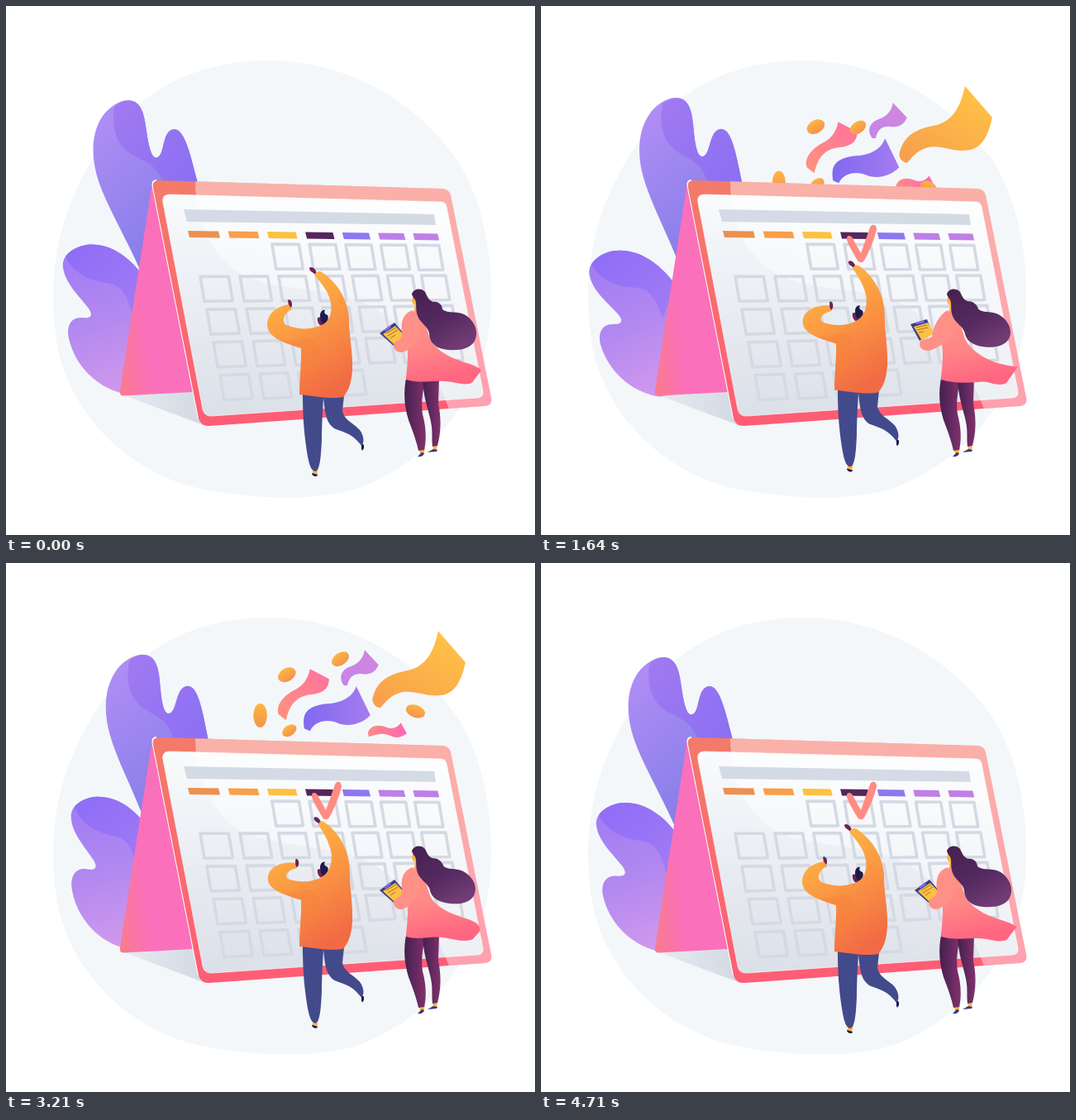
These frames come from a looping animation (640 by 640 pixels, 4.78 s). An HTML page:

```html
<!DOCTYPE html>
<html lang="en">
<head>
<meta charset="utf-8">
<title>Calendar celebration</title>
<style>
html, body { margin: 0; width: 100%; height: 100%; overflow: hidden; background: #fff; }
svg { display: block; width: 100vw; height: 100vh; }
</style>
</head>
<body>
<svg viewBox="0 0 640 640" xmlns="http://www.w3.org/2000/svg">
<defs>
  <linearGradient id="leafA" x1="0" y1="0" x2=".5" y2="1"><stop stop-color="#b48ff7"/><stop offset=".75" stop-color="#8c80ea"/><stop offset="1" stop-color="#837ce8"/></linearGradient>
  <linearGradient id="leafB" x1="0" y1="0" x2="1" y2=".8"><stop stop-color="#a17af1"/><stop offset="1" stop-color="#8b6ff3"/></linearGradient>
  <linearGradient id="leafC" x1=".3" y1="0" x2=".5" y2="1"><stop stop-color="#a07cf5"/><stop offset=".5" stop-color="#b188f0"/><stop offset="1" stop-color="#cf98ed"/></linearGradient>
  <linearGradient id="leafD" x1="0" y1="0" x2="1" y2="1"><stop stop-color="#8e6cf8"/><stop offset="1" stop-color="#a27df3"/></linearGradient>
  <linearGradient id="side" x1="0" y1="1" x2=".4" y2=".86"><stop stop-color="#f97c8c"/><stop offset="1" stop-color="#fb70ba"/></linearGradient>
  <linearGradient id="shade"><stop stop-color="#e6ebf1"/><stop offset="1" stop-color="#d3dae3"/></linearGradient>
  <linearGradient id="frame" x1="0" y1="0" x2=".15" y2="1"><stop stop-color="#f37b69"/><stop offset="1" stop-color="#fe5d75"/></linearGradient>
  <linearGradient id="panel" x1=".5" y1="0" x2=".4" y2="1"><stop stop-color="#fbfcfd"/><stop offset=".35" stop-color="#eff2f6"/><stop offset="1" stop-color="#dce0e8"/></linearGradient>
  <linearGradient id="shirt" x1=".2" y1="0" x2=".6" y2="1"><stop stop-color="#ffbc42"/><stop offset=".45" stop-color="#fb9a42"/><stop offset="1" stop-color="#f26a44"/></linearGradient>
  <linearGradient id="coat" x1="0" y1="0" x2=".2" y2="1"><stop stop-color="#ff9585"/><stop offset=".55" stop-color="#ff8686"/><stop offset="1" stop-color="#ff6681"/></linearGradient>
  <linearGradient id="hair" x1="0" y1="0" x2=".6" y2="1"><stop stop-color="#46204f"/><stop offset=".6" stop-color="#542a60"/><stop offset="1" stop-color="#713b73"/></linearGradient>
  <linearGradient id="tights"><stop stop-color="#43204f"/><stop offset="1" stop-color="#81316c"/></linearGradient>
  <linearGradient id="gold" x1=".8" y1="0" x2=".2" y2="1"><stop stop-color="#ffc445"/><stop offset="1" stop-color="#f8a04c"/></linearGradient>
  <linearGradient id="amber" x1="0" y1="0" x2="0" y2="1"><stop stop-color="#ffb440"/><stop offset="1" stop-color="#f2954f"/></linearGradient>
  <linearGradient id="rose" x1="1" y1="0" x2="0" y2="1"><stop stop-color="#ff71a0"/><stop offset="1" stop-color="#ff937c"/></linearGradient>
  <linearGradient id="pink"><stop stop-color="#ff8a83"/><stop offset="1" stop-color="#fd68b5"/></linearGradient>
  <linearGradient id="lilac" x1="0" y1="1" x2="1" y2="0"><stop stop-color="#c484e9"/><stop offset="1" stop-color="#d287dc"/></linearGradient>
  <linearGradient id="iris"><stop stop-color="#8069f0"/><stop offset="1" stop-color="#a57cf0"/></linearGradient>
  <clipPath id="board"><path id="boardShape" d="M186 211L529 221Q536 222 538 229L587 474Q589 483 579 484L246 508Q236 509 233 499L178 220Q176 211 186 211Z"/></clipPath>
  <mask id="drawn" maskUnits="userSpaceOnUse" x="350" y="250" width="70" height="70">
    <path id="stroke" d="M370 275L387 306L404 262" pathLength="1" fill="none" stroke="#fff" stroke-width="16" stroke-dasharray="1 2"/>
  </mask>
</defs>

<path fill="#f3f7fa" d="M318 66C415 66 497 117 545 185C573 226 588 290 587 355C587 465 520 542 440 578C390 600 310 598 240 585C140 565 75 485 62 410C50 340 60 270 90 212C140 110 220 66 318 66Z"/>
<path fill="url(#shade)" d="M140 470L226 464L236 506Z"/>

<g id="tall">
  <path fill="url(#leafA)" d="M175 350C152 290 125 250 112 212C103 185 102 155 117 133C128 118 145 110 156 116C170 124 168 150 174 172C177 184 183 188 188 177C192 165 192 151 203 149C217 148 224 185 232 214L240 340Z"/>
  <path fill="url(#leafB)" d="M131 122C127 150 135 172 157 182C173 190 184 196 190 214L195 228L235 228L232 214C224 185 217 148 203 149C192 151 192 165 188 177C183 188 177 184 174 172C168 150 170 124 156 116C147 112 138 116 131 122Z"/>
</g>
<g id="low">
  <path fill="url(#leafC)" d="M172 336C150 300 122 286 97 289C80 292 67 303 69 316C71 335 88 350 100 366C107 377 100 378 92 377C78 376 73 388 76 402C82 430 105 460 142 469L170 466Z"/>
  <path fill="url(#leafD)" d="M72 303C85 330 110 333 128 336C142 340 148 355 153 375L172 336C150 300 122 286 97 289C86 291 77 296 72 303Z"/>
</g>
<g id="confetti"></g>

<path fill="url(#side)" d="M177 213L226 467L142 471.5Q137 471.5 138 465Z"/>
<path fill="none" stroke="#fff" stroke-width="2" d="M182 211Q176 211 178 220L233 499"/>
<use href="#boardShape" fill="url(#frame)"/>
<path fill="url(#panel)" stroke="#fff" stroke-opacity=".6" d="M198 228L526 237Q532 237 533 243L577 466Q578 473 571 474L250 496Q240 497 238 488L190 238Q188 228 198 228Z"/>
<path clip-path="url(#board)" fill="#fff" fill-opacity=".42" d="M229 205C228 250 240 290 275 318C320 350 400 335 450 368C495 398 518 440 537 490L600 490L560 205Z"/>
<path fill="#d5dbe5" d="M215 246L518 252L520 265L219 261Z"/>
<g id="days"></g>
<path id="cells" fill="none" stroke="#d4d9e3" stroke-width="3.6" stroke-linejoin="round"/>
<path mask="url(#drawn)" fill="#ff8b84" d="M370 283C369 278 374 276 377 281L387 299L398 268C400 263 406 264 406 270C405 278 397 298 391 308C389 311 385 311 383 308C379 301 372 290 370 283Z"/>

<g id="man">
  <path fill="#fdb43f" d="M371 559L378 559L376 567L371 567Z"/>
  <path fill="#1f1a4b" d="M370 565L377 567Q377 569 374 569Q370 568 370 565ZM430 529L433 531L433 535L431 538L430 536Z"/>
  <path fill="#434a8b" d="M359 470C359 500 361 522 365 545C367 555 369 562 374 563C380 562 381 545 382 525C382 508 383 490 384 474C386 490 386 503 397 511C409 516 419 517 430 532C434 528 433 520 428 513C421 505 409 501 407 490L409 471Z"/>
  <path fill="#6b2358" d="M377 377C376 382 379 388 384 387L387 375Z"/>
  <path fill="#1f1a4b" d="M380 375C380 370 383 367 386 368C384 371 386 373 389 374C391 378 389 383 384 385L381 381Z"/>
  <path id="handUp" fill="#6b2358" d="M367 317C368 315 372 316 374 319C377 323 375 327 372 323C369 321 367 320 367 317Z"/>
  <path id="handLow" fill="#6b2358" d="M341 356C342 354 346 356 346 361C346 367 342 366 342 362Z"/>
  <path fill="url(#shirt)" data-by="lift" d="M373 325C376 321 379 320 382 322C399 333 414 354 415 378C415 400 420 420 419 440C418 455 415 465 408 473C395 476 372 472 355 470C355 450 358 430 357 414C335 407 316 401 316 385C317 370 330 363 342 361L346 367C336 371 333 381 339 386C352 391 366 392 376 388C388 386 395 376 393 360C391 346 383 338 373 325Z"
    data-to="M379 322C380 318 383 317 386 319C402 330 416 352 416 378C416 400 420 420 419 440C418 455 415 465 408 473C395 476 372 472 355 470C355 450 358 430 357 414C337 408 317 402 317 389C317 374 335 369 351 371L354 378C343 379 337 385 341 389C352 393 366 393 376 389C388 385 395 374 394 358C392 346 387 334 379 322Z"/>
  <path fill="#f5813c" fill-opacity=".4" d="M330 404C345 408 358 402 368 401C380 405 382 422 377 434C371 446 360 447 356 451C357 434 357 424 357 414Q343 410 330 404Z"/>
</g>

<g id="woman">
  <path fill="#fdb43f" d="M500 536L507 535L505 543L501 543ZM516 530L522 530L521 538L517 538Z"/>
  <path fill="#343a80" d="M498 545L503 540L506 541C505 545 501 546 498 545ZM510 540L517 536L522 537L521 539Z"/>
  <path fill="url(#tights)" d="M487 438C480 462 481 481 487 501C492 514 497 528 499 538L506 537C509 524 508 508 504 494C502 480 504 468 507 453Z"/>
  <path fill="url(#tights)" d="M504 450C505 478 513 492 515 509C516 518 515 526 516 533L522 532C526 517 527 500 523 481L524 450Z"/>
  <path fill="#3a3f86" data-by="raise" d="M452 396L470 383L486 402L469 411Z" data-to="M447 385L467 379L473 394L458 405Z"/>
  <path fill="#fdc041" data-by="raise" d="M456 397L471 387L486 403L470 410Z" data-to="M451 388L468 383L475 396L461 405Z"/>
  <path fill="#7a6cec" data-by="raise" d="M457 392L465 386L466 389L459 394Z" data-to="M453 383L463 380L464 383L454 385Z"/>
  <path fill="none" stroke="#9a6a3c" stroke-width=".9" data-by="raise" d="M460 396L472 389M462 399L474 392M465 402L471 398" data-to="M454 389L467 386M455 392L468 389M457 395L463 394"/>
  <path fill="#fdb43f" d="M493 351C490 356 491 360 495 362L493 372L500 374L500 354Z"/>
  <path fill="url(#coat)" data-by="sway" d="M497 367C488 371 480 385 484 405C488 420 485 435 484 452C500 457 515 456 530 455C540 452 552 462 563 456L577 436C565 435 555 434 540 427C526 420 515 410 512 400C508 385 503 375 497 367Z"
    data-to="M497 367C488 371 480 385 484 405C488 420 485 435 484 452C500 457 515 450 530 453C545 456 556 459 565 455L573 446C575 434 564 433 540 424C526 418 515 410 512 400C508 385 503 375 497 367Z"/>
  <path fill="#ff9087" data-by="raise" d="M492 368C482 371 477 380 479 395C480 402 475 405 470 407C467 412 471 420 479 419C488 416 497 410 502 393Z"
    data-to="M492 368C482 373 474 388 473 400C468 403 462 404 459 405C456 411 460 418 470 417C482 413 492 406 502 393Z"/>
  <path fill="url(#hair)" data-by="lift" d="M491 349C492 342 502 340 507 346C510 352 511 356 517 358C523 357 528 362 528 367C535 373 546 368 556 374C568 382 572 395 567 405C562 415 548 417 535 416C520 415 512 407 512 396C510 386 500 384 497 372C495 362 498 358 493 353Z"
    data-to="M491 349C492 342 502 340 507 346C510 352 511 356 517 357C523 357 528 362 530 367C536 372 548 368 556 375C566 382 570 392 566 401C561 410 549 412 538 411C523 409 515 404 513 395C510 386 500 384 497 372C495 362 498 358 493 353Z"/>
</g>
</svg>

<script>
const LOOP = 4780, STEP = 1000 / 14;
const $ = id => document.getElementById(id);
const clamp = v => Math.min(1, Math.max(0, v));
const ease = v => (1 - Math.cos(Math.PI * clamp(v))) / 2;

function add(parent, name, attrs) {
  const el = document.createElementNS('http://www.w3.org/2000/svg', name);
  for (const k in attrs) el.setAttribute(k, attrs[k]);
  return parent.appendChild(el);
}

// Calendar sheet: weekday bars and slanted cells
['#ec914f', '#f99f4a', '#fdc141', '#54265c', '#8d78f0', '#be80e6', '#be80e6'].forEach((fill, c) => {
  const x = 220 + 49.3 * c - .65 * c * c, y = 272 + .5 * c, w = 37 - 1.2 * c;
  add($('days'), 'path', { fill, d: `M${x} ${y}l${w} .4l2 8.1l${-w} -.4Z` });
});
let grid = '';
for (let r = 0; r < 5; r++) {
  for (let c = r ? 0 : 2; c < (r < 4 ? 7 : 4); c++) {
    const x = 227 + 8 * r + 48.8 * c - .7 * c * c;
    const y = 287.5 + 39.8 * r + c * (.3 - .5 * r);
    const w = 34.3 - .85 * c, tilt = .3 - .4 * r;
    grid += `M${x} ${y}l${w} ${tilt}l5 29.5l${-w} ${.5 - tilt}Z`;
  }
}
$('cells').setAttribute('d', grid);

// Confetti: resting centre, distance left to fly at 500 ms, fill, shape
const oval = (rx, ry, turn) => ({ rx, ry, turn });
const bits = [
  [500, 130, 96, 'gold', 'M523 82L556 120C551 145 541 160 523 160C505 161 492 152 476 157C463 161 458 170 453 175L449 174C444 170 442 166 445 159C451 141 465 134 485 130C505 126 517 112 523 82Z'],
  [361, 159, 79, 'rose', 'M368 128L391 140C391 154 380 158 368 159C351 161 343 172 339 190L330 183C326 172 336 160 350 153C361 147 365 140 368 128Z'],
  [428, 127, 78, 'lilac', 'M434 105L451 123C447 132 441 135 432 134C422 133 416 136 413 148L409 148C405 143 404 136 408 131C413 124 420 126 427 119C431 115 433 111 434 105Z'],
  [401, 175, 73, 'iris', 'M424 149L441 184C430 195 415 198 403 194C390 188 374 190 368 203L361 200C359 186 361 178 374 173C388 168 398 172 411 164C418 160 421 156 424 149Z'],
  [462, 202, 80, 'pink', 'M478 193L485 206C479 211 471 212 466 209C459 206 454 205 439 210L438 205C440 198 447 195 456 197C466 201 472 201 478 193Z'],
  [340, 135, 72, 'amber', oval(11.5, 8, -30)],
  [405, 115.5, 204, 'amber', oval(11.5, 7.5, -35)],
  [496, 178.5, 259, 'amber', oval(12, 7.5, 20)],
  [308, 184, 191, 'amber', oval(8.3, 14.5, 0)],
  [343, 202.5, 85, 'amber', oval(9.5, 6.3, -35)]
].map(([x, y, reach, tint, shape]) => {
  const fill = `url(#${tint})`, g = add($('confetti'), 'g', {});
  if (shape.rx) add(g, 'ellipse', { cx: x, cy: y, rx: shape.rx, ry: shape.ry, fill, transform: `rotate(${shape.turn} ${x} ${y})` });
  else add(g, 'path', { d: shape, fill });
  return { x, y, reach, g };
});

// Paths that blend between two poses
const NUM = /-?\d+(\.\d+)?/g;
const morphs = [...document.querySelectorAll('[data-to]')].map(el => ({
  el, by: el.dataset.by, from: el.getAttribute('d'), to: el.dataset.to.match(NUM).map(Number)
}));
const move = (id, v) => $(id).setAttribute('transform', v);

// Exponential slow-down that comes to rest at 3350 ms
const rest = Math.exp(-.0014 * 2850);
const remaining = t => Math.max(0, Math.exp(-.0014 * (t - 500)) - rest) / (1 - rest);

function draw(t) {
  const turn = 4 * Math.PI * t / LOOP;
  const wave = Math.sin(turn);
  const pose = {
    lift: (1 - Math.cos(turn)) / 2,
    sway: (1 + wave) / 2,
    raise: ease(t / 1000) - ease((t - 2200) / 1000)
  };
  for (const m of morphs) {
    let i = 0;
    m.el.setAttribute('d', m.from.replace(NUM, n => (+n + (m.to[i++] - n) * pose[m.by]).toFixed(2)));
  }
  const up = pose.lift;
  move('tall', `rotate(${4 * up} 215 455)`);
  move('low', `rotate(${4.9 * wave} 190 450)`);
  move('man', `translate(0 ${-8 * up})`);
  move('handUp', `translate(${7 * up} ${-3 * up})`);
  move('handLow', `translate(${10.5 * up} ${11.5 * up}) rotate(${14 * up} 343 361)`);
  $('stroke').setAttribute('stroke-dashoffset', 1 - clamp((t - 70) / 360));

  for (const b of bits) {
    const d = b.reach * remaining(t);
    const size = clamp(1.3 - d / 105);
    b.g.setAttribute('transform', `translate(${b.x - .565 * d} ${b.y + .825 * d}) scale(${size}) translate(${-b.x} ${-b.y})`);
  }
  $('confetti').setAttribute('opacity', clamp((4500 - t) / 700));
}

const start = performance.now();
function tick() {
  const t = (performance.now() - start) % LOOP;
  draw(Math.floor((t + 5) / STEP) * STEP % LOOP);
  requestAnimationFrame(tick);
}
tick();
</script>
</body>
</html>
```
